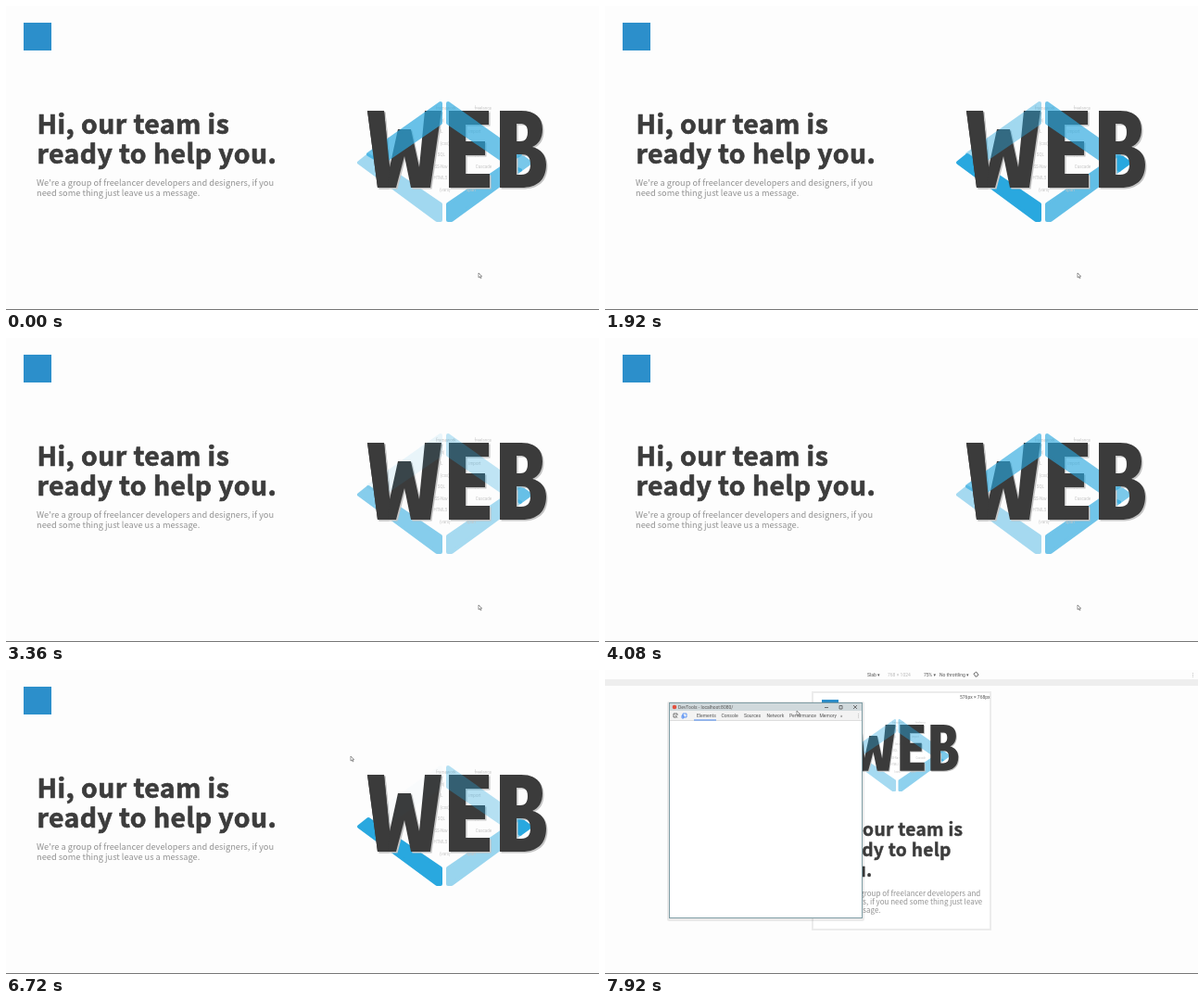
These frames come from a looping animation (640 by 328 pixels, 8 s). An HTML page:

```html
<!DOCTYPE html>
<html lang="en">
<head>
<meta charset="utf-8">
<style>
html, body { margin: 0; width: 100%; height: 100%; overflow: hidden; background: #fdfdfd; }
svg { display: block; width: 640px; height: 328px; }
text { font-family: "Noto Sans CJK SC", "Noto Sans", sans-serif; }
.title { font-weight: 900; fill: #3c3c3c; stroke: #3c3c3c; stroke-width: .025em; letter-spacing: .015em; }
.lead { font-weight: 300; fill: #929292; }
.ui text, .code text { font-family: Roboto, sans-serif; font-size: 5px; fill: #555; }
.code text { font-size: 4.5px; fill: #c6c6c6; }
.bar { fill: #29a8df; stroke: #29a8df; stroke-width: 4; stroke-linejoin: round; }
.icon { fill: none; stroke: #555; stroke-width: .8; }
</style>
</head>
<body>
<svg viewBox="0 0 640 328">
  <defs>
    <path id="web" fill-rule="evenodd" d="M390 113H408L414 174L423 133H437L446 174L452 113H470L458 196H437L430 162L421 196H401Z
      M478 113H521V128H496V146H517V161H496V181H522V196H478Z"/>
    <path id="front" fill-rule="evenodd" d="M390 113H408L414 174L412 196H401Z
      M533 113H556C571 113 579 120 579 133C579 143 575 149 568 152C577 154 583 161 583 171C583 188 573 196 556 196H533Z
      M551 127V146H555C560 146 563 143 563 136C563 129 560 127 555 127Z
      M551 160V182H556C563 182 566 178 566 171C566 163 563 160 556 160Z"/>
    <!-- The upper bars weave over the inner letters and under the outer strokes -->
    <g id="art">
      <path class="bar" id="bottomLeft" d="M381 169L391 161L469 214V231H465Z"/>
      <path class="bar" id="bottomRight" d="M555 177L481 231H477V214L540 171Z"/>
      <path class="bar" id="tip" d="M555 161L566 169L555 177L544 169Z"/>
      <g class="code" id="snippets"></g>
      <g fill="#c4c4c4" transform="translate(1.5 1.5)"><use href="#web"/><use href="#front"/></g>
      <use href="#web" fill="#3b3b3b"/>
      <path class="bar" id="topLeft" d="M469 105L391 160L406 169L469 126Z"/>
      <path class="bar" id="topRight" d="M477 105L555 160L540 169L477 126Z"/>
      <use href="#front" fill="#3b3b3b"/>
    </g>
  </defs>

  <g id="desktop">
    <rect x="19" y="18" width="30" height="30" fill="#2c8fcb"/>
    <g class="title" font-size="28.4">
      <text x="33.500" y="138">Hi, our team is</text>
      <text x="33.500" y="170">ready to help you.</text>
    </g>
    <g class="lead" font-size="9.25">
      <text x="33" y="194">We're a group of freelancer developers and designers, if you</text>
      <text x="33" y="205">need some thing just leave us a message.</text>
    </g>
    <use href="#art"/>
  </g>

  <g id="tablet" class="ui">
    <rect y="10" width="640" height="7" fill="#eee"/>
    <rect x="224" y="24" width="192" height="256" fill="#fff" stroke="#ececec" stroke-width="2"/>
    <text x="283" y="7">Slab ▾</text>
    <text x="305" y="7" style="fill:#bbb">768 × 1024</text>
    <text x="344" y="7">75% ▾</text>
    <text x="361" y="7">No throttling ▾</text>
    <rect class="icon" x="399" y="2.5" width="3.5" height="4" transform="rotate(-35 401 5)"/>
    <text x="632" y="7">⋮</text>
    <text x="383" y="31">576px × 768px</text>
    <rect x="234" y="32" width="18" height="18" fill="#2c8fcb"/>
    <use href="#art" transform="translate(31.5 -8.8) scale(.6)"/>
  </g>
  <g id="tabletText">
    <g class="title" font-size="19.2">
      <text x="246" y="179">Hi, our team is</text>
      <text x="246" y="201">ready to help</text>
      <text x="246" y="223">you.</text>
    </g>
    <g class="lead" font-size="8">
      <text x="246" y="244">We're a group of freelancer developers and</text>
      <text x="246" y="253">designers, if you need some thing just leave</text>
      <text x="246" y="262">us a message.</text>
    </g>
  </g>

  <g id="devtools" class="ui">
    <rect x="67" y="34" width="213" height="237" rx="2" opacity=".08"/>
    <rect x="69.5" y="35.5" width="208" height="232" fill="#fff" stroke="#7f9da5"/>
    <rect x="70" y="36" width="207" height="8" fill="#d0d9dc"/>
    <rect x="70" y="44" width="207" height="10" fill="#f3f3f3"/>
    <path d="M70 54.5H277" stroke="#ddd"/>
    <path d="M96 54H120" stroke="#4285f4"/>
    <circle cx="75" cy="40" r="2.3" fill="#e2513f"/>
    <text x="79" y="42">DevTools - localhost:8080/</text>
    <path class="icon" d="M237 40.5h4M253 38.5h3v3.5h-3zM268 38l4 4m0-4l-4 4M77 51h-3v-4h4v2M76 48.5l2 3"/>
    <path class="icon" style="stroke:#4285f4" d="M84 47h4v4h-4zM83 49h2v3h-2z"/>
    <g id="tabs"></g>
    <text x="271" y="51">⋮</text>
  </g>

  <path d="M0 327.5H640" stroke="#777"/>
  <path id="cursor" d="M0 0V6L1.500 4.700L2.600 7L3.600 6.500L2.600 4.300H4.300Z" fill="#fff" stroke="#555" stroke-width=".7"/>
</svg>
<script>
const LOOP = 8000, PULSE = 4160;
const $ = id => document.getElementById(id);
const label = (text, x, y) => `<text x="${x}" y="${y}">${text}</text>`;

// Faint code words in two columns behind the letters
const words = 'framework freelance (touch) #START SQL import {css} type SQL app.us CSS-Nav Cascade HTML5 class {vars} span';
$('snippets').innerHTML = words.split(' ').map((word, i) => {
  const row = i >> 1, drift = 5 * Math.sin(i * 2.4);
  return label(word, (i % 2 ? 502 : 464) + drift, 112 + row * 12.5);
}).join('');

let tabX = 99;
$('tabs').innerHTML = 'Elements Console Sources Network Performance Memory »'.split(' ').map(name => {
  const tab = label(name, tabX, 51);
  tabX += 10.5 + 2 * name.length;
  return tab;
}).join('');

// Each piece breathes around a middle opacity and clips at 0 and 1
const pulses = {
  topLeft: { mid: .5, swing: .55, peak: 800 },
  topRight: { mid: .62, swing: .38, peak: 950 },
  bottomRight: { mid: .68, swing: .3, peak: 1000 },
  bottomLeft: { mid: .85, swing: .45, peak: 1850 },
  tip: { mid: .9, swing: .3, peak: 1850 }
};

const ease = (t, start, end) => {
  const p = Math.min(1, Math.max(0, (t - start) / (end - start)));
  return p * p * (3 - 2 * p);
};
const show = (id, on) => { $(id).style.display = on ? '' : 'none'; };

function draw(now) {
  const t = now % LOOP;
  for (const [id, { mid, swing, peak }] of Object.entries(pulses)) {
    $(id).style.opacity = mid + swing * Math.cos(2 * Math.PI * (t - peak) / PULSE);
  }
  show('desktop', t < 7200);
  show('devtools', t >= 7280);
  show('tablet', t >= 7440);
  show('tabletText', t >= 7440);

  const toArt = ease(t, 4960, 5280), toWindow = ease(t, 7200, 7800);
  const x = 510 - 138 * toArt - 165 * toWindow;
  const y = 288 - 195 * toArt - 49 * toWindow;
  $('cursor').setAttribute('transform', `translate(${x} ${y}) scale(.85)`);
  requestAnimationFrame(draw);
}
requestAnimationFrame(draw);
</script>
</body>
</html>
```
